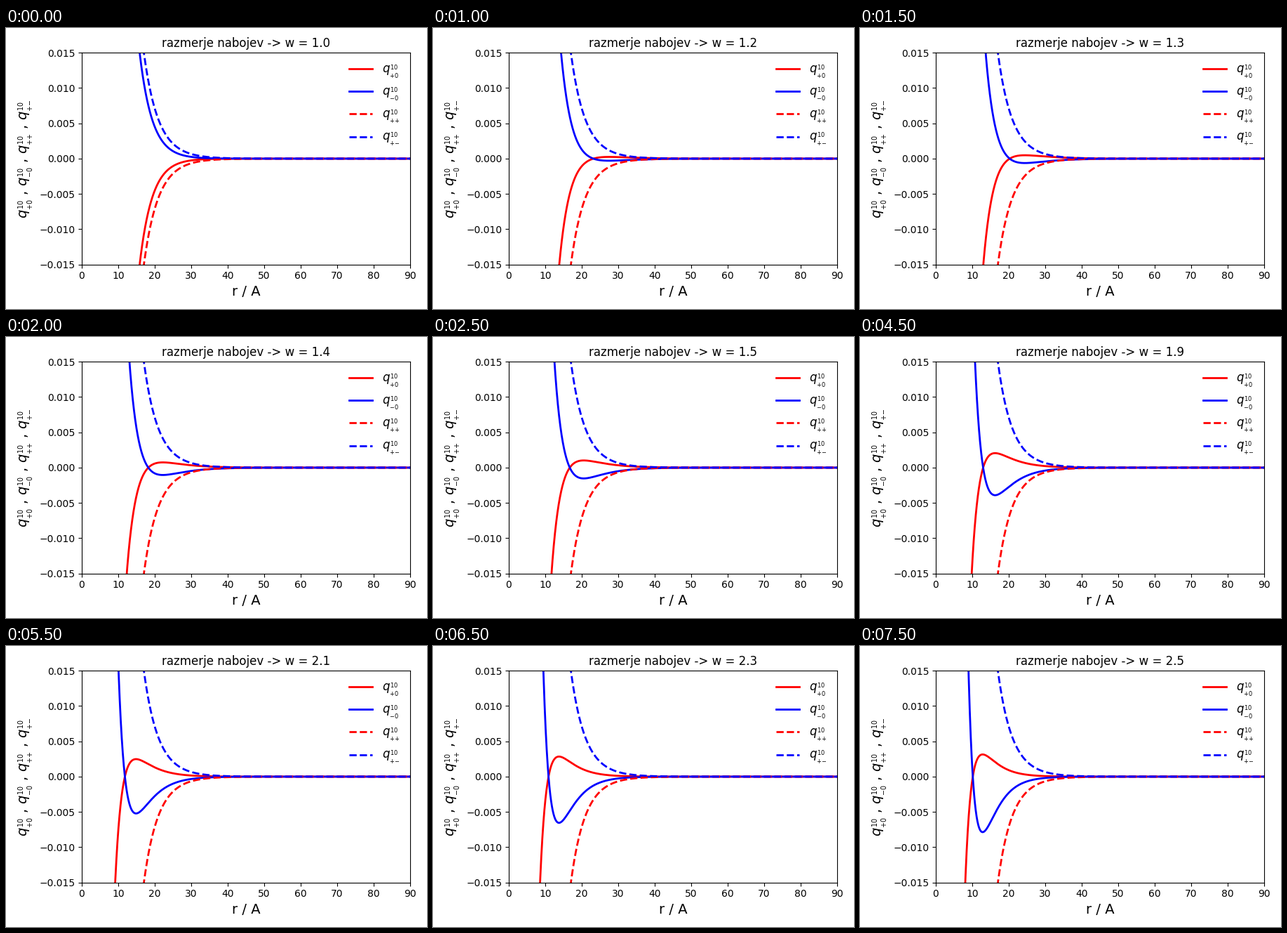
A matplotlib script for the animation above (8 s loop, 600 px wide and 400 px high).

```python
import numpy as np
import matplotlib.pyplot as plt
from matplotlib.animation import FuncAnimation

plt.rcParams["font.family"] = "DejaVu Sans"

STEPS = 16
LIMIT = 0.015
SIGNS = ("{+}0", "{-}0", "{+}{+}", "{+}{-}")
LABELS = [r"$q^{_{10}}_{_{%s}}$" % s for s in SIGNS]

r = np.linspace(5, 90, 1500)


def solid(w):
    """Two screened exponentials whose decay rate grows with the charge ratio."""
    d = w - 1
    kappa = 0.0725 * (1 + w) + 0.0016 * d**2
    z = np.exp(-kappa * r)
    return (1.49 + 0.56 * d) * (0.6 * d / (1 + w) ** 2 * z - z**2)


def dashed():
    r0 = 17.02
    return -LIMIT * r0 / r * np.exp(-0.197 * (r - r0))


fig, ax = plt.subplots(figsize=(6, 4), dpi=100)
base = solid(1.0)
pair = dashed()
plus, = ax.plot(r, base, "r-", lw=2, label=LABELS[0])
minus, = ax.plot(r, -base, "b-", lw=2, label=LABELS[1])
ax.plot(r, pair, "r--", lw=2, label=LABELS[2])
ax.plot(r, -pair, "b--", lw=2, label=LABELS[3])

ax.set_xlim(0, 90)
ax.set_ylim(-LIMIT, LIMIT)
ax.set_xticks(range(0, 91, 10))
ax.set_xlabel("r / A", fontsize=14)
ax.set_ylabel(" , ".join(LABELS), fontsize=14)
ax.legend(loc="upper right", fontsize=12, frameon=False)
title = ax.set_title("razmerje nabojev -> w = 1.0", fontsize=12)
fig.tight_layout()
fig.subplots_adjust(left=0.18, right=0.96, top=0.912)


def update(i):
    w = 1 + i / 10
    y = solid(w)
    plus.set_ydata(y)
    minus.set_ydata(-w * y)
    title.set_text(f"razmerje nabojev -> w = {w:.1f}")
    return plus, minus, title


anim = FuncAnimation(fig, update, frames=STEPS, interval=500,
                     repeat=True, repeat_delay=0, blit=False)
plt.show()
```
